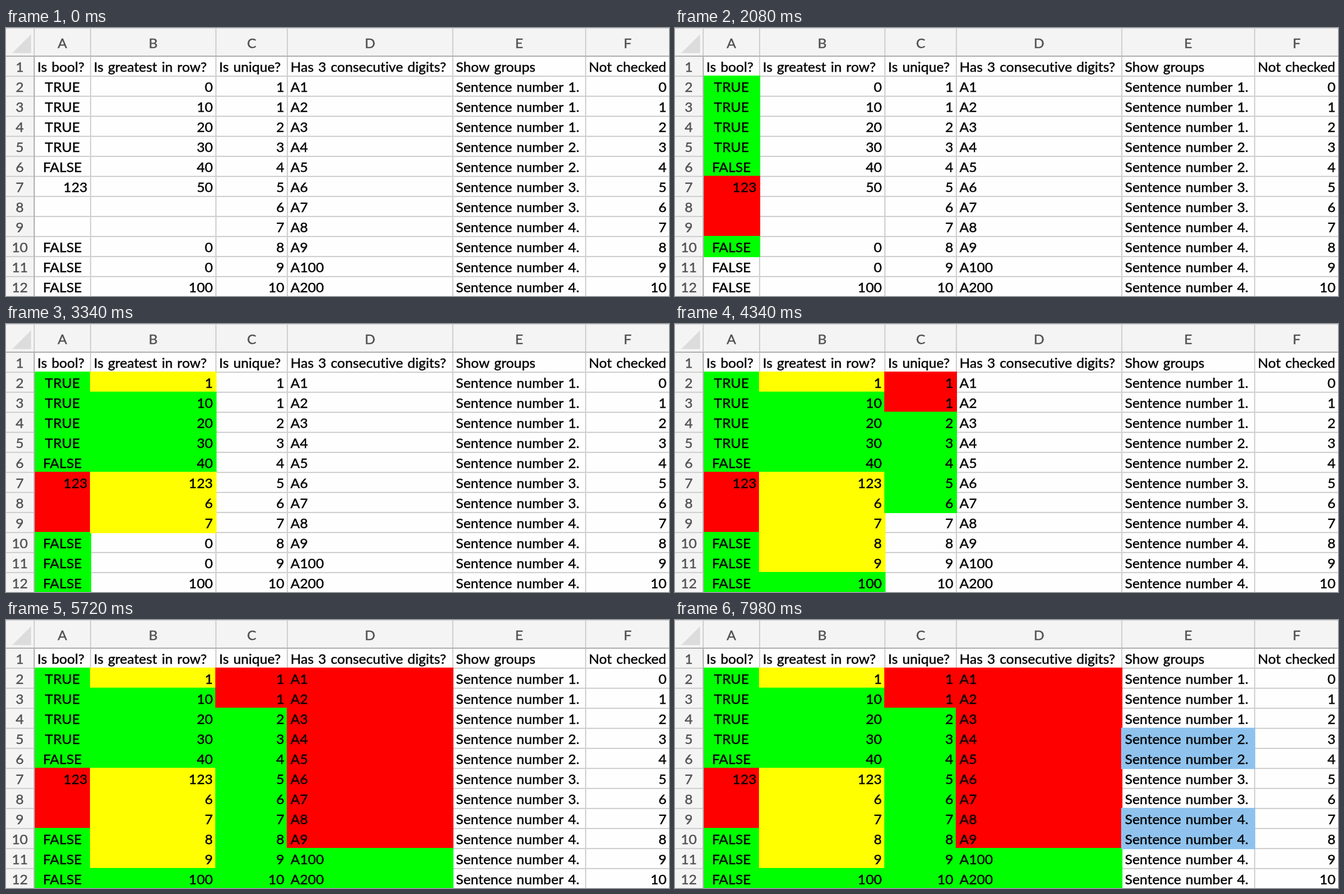
An HTML page with a canvas that plays this animation: 1058x428 px, repeating every 8 s.

```html
<!DOCTYPE html>
<html lang="en">
<head>
<meta charset="utf-8">
<style>
html, body { margin: 0; width: 100%; height: 100%; overflow: hidden; background: #fefefe; }
canvas { display: block; }
</style>
</head>
<body>
<canvas id="sheet" width="1058" height="428"></canvas>
<script>
const ctx = document.getElementById('sheet').getContext('2d');
const LOOP = 8000, START = 1360, TICK = 77;
const ROW_H = 32, TOP = 44, LINE = 2;
const edges = [44, 134, 334, 448, 712, 924, 1058];
const colors = { g: '#00ff00', r: '#ff0000', y: '#ffff00', b: '#8fc3ee' };

// marks: one letter per row, '-' stays blank; cost: ticks per check
const columns = [
  { title: 'Is bool?', align: 'center', marks: 'gggggrrrggg', cost: 1,
    cells: 'TRUE,TRUE,TRUE,TRUE,FALSE,123,,,FALSE,FALSE,FALSE' },
  { title: 'Is greatest in row?', align: 'right', marks: 'yggggyyyyyg', cost: 1,
    cells: '0,10,20,30,40,50,,,0,0,100', fixed: '1,10,20,30,40,123,6,7,8,9,100' },
  { title: 'Is unique?', align: 'right', marks: 'rrggggggggg', cost: 1,
    cells: '1,1,2,3,4,5,6,7,8,9,10' },
  { title: 'Has 3 consecutive digits?', align: 'left', marks: 'rrrrrrrrrgg', cost: 1,
    cells: 'A1,A2,A3,A4,A5,A6,A7,A8,A9,A100,A200' },
  { title: 'Show groups', align: 'left', marks: '---bb--bbbb', cost: 3.5,
    cells: [1, 1, 1, 2, 2, 3, 3, 4, 4, 4, 4].map(n => `Sentence number ${n}.`).join() },
  { title: 'Not checked', align: 'right', marks: '', cost: 0,
    cells: '0,1,2,3,4,5,6,7,8,9,10' }
];

let ticks = 0;
for (const col of columns) {
  col.cells = col.cells.split(',');
  col.fixed = col.fixed ? col.fixed.split(',') : col.cells;
  col.times = [...col.marks].map(mark => {
    ticks += mark === 'y' ? 2.5 : col.cost; // corrections take longer
    return START + ticks * TICK;
  });
}

const rowTop = row => TOP + ROW_H * (row - 1);
const middle = c => (edges[c] + edges[c + 1]) / 2 + 1;

function box(color, x, y, w, h) {
  ctx.fillStyle = color;
  ctx.fillRect(x, y, w, h);
}

function label(text, x, y, align, color = '#000') {
  ctx.fillStyle = ctx.strokeStyle = color;
  ctx.textAlign = align;
  ctx.fillText(text, x, y);
  ctx.strokeText(text, x, y);
}

function cellText(text, c, row, align) {
  const x = { left: edges[c] + 6, center: middle(c), right: edges[c + 1] - 4 }[align];
  label(text, x, rowTop(row) + 26, align);
}

function drawGrid() {
  const line = '#d2d2d2';
  box('#fefefe', 0, 0, 1058, 428);
  box('#f4f4f4', 0, 0, 1058, TOP);
  box('#f4f4f4', 0, 0, 44, 428);
  box(line, 0, 0, 1058, 1);
  ctx.fillStyle = '#dcdcdc';
  ctx.beginPath();
  ctx.moveTo(10, 40);
  ctx.lineTo(40, 10);
  ctx.lineTo(40, 40);
  ctx.fill();
  for (const x of edges) box(line, x, 0, LINE, 428);
  for (let row = 2; row <= 12; row++) box(line, 0, rowTop(row), 1058, LINE);
}

function drawMarks(t) {
  columns.forEach((col, c) => col.times.forEach((time, i) => {
    const color = colors[col.marks[i]];
    if (t < time || !color) return;
    box(color, edges[c], rowTop(i + 2), edges[c + 1] - edges[c] + LINE, ROW_H + LINE);
  }));
  box('#b4b4b4', 0, TOP, 1058, LINE);
  box('#b4b4b4', edges[0], TOP, LINE, 384);
}

function drawText(t) {
  const ink = '#505050';
  for (let row = 1; row <= 12; row++) label(row, 22, rowTop(row) + 26, 'center', ink);
  columns.forEach((col, c) => {
    label('ABCDEF'[c], middle(c), 32, 'center', ink);
    cellText(col.title, c, 1, 'left');
    col.cells.forEach((text, i) => {
      const shown = t >= col.times[i] ? col.fixed[i] : text;
      cellText(shown, c, i + 2, shown === '123' ? 'right' : col.align);
    });
  });
}

ctx.font = '22px Lato, Carlito, sans-serif';
ctx.letterSpacing = '0.05px'; // keeps letters unjoined
ctx.wordSpacing = '1.5px';
ctx.lineWidth = 0.4;
const begin = performance.now();
function frame() {
  const t = (performance.now() - begin) % LOOP;
  drawGrid();
  drawMarks(t);
  drawText(t);
  requestAnimationFrame(frame);
}
frame();
</script>
</body>
</html>
```
